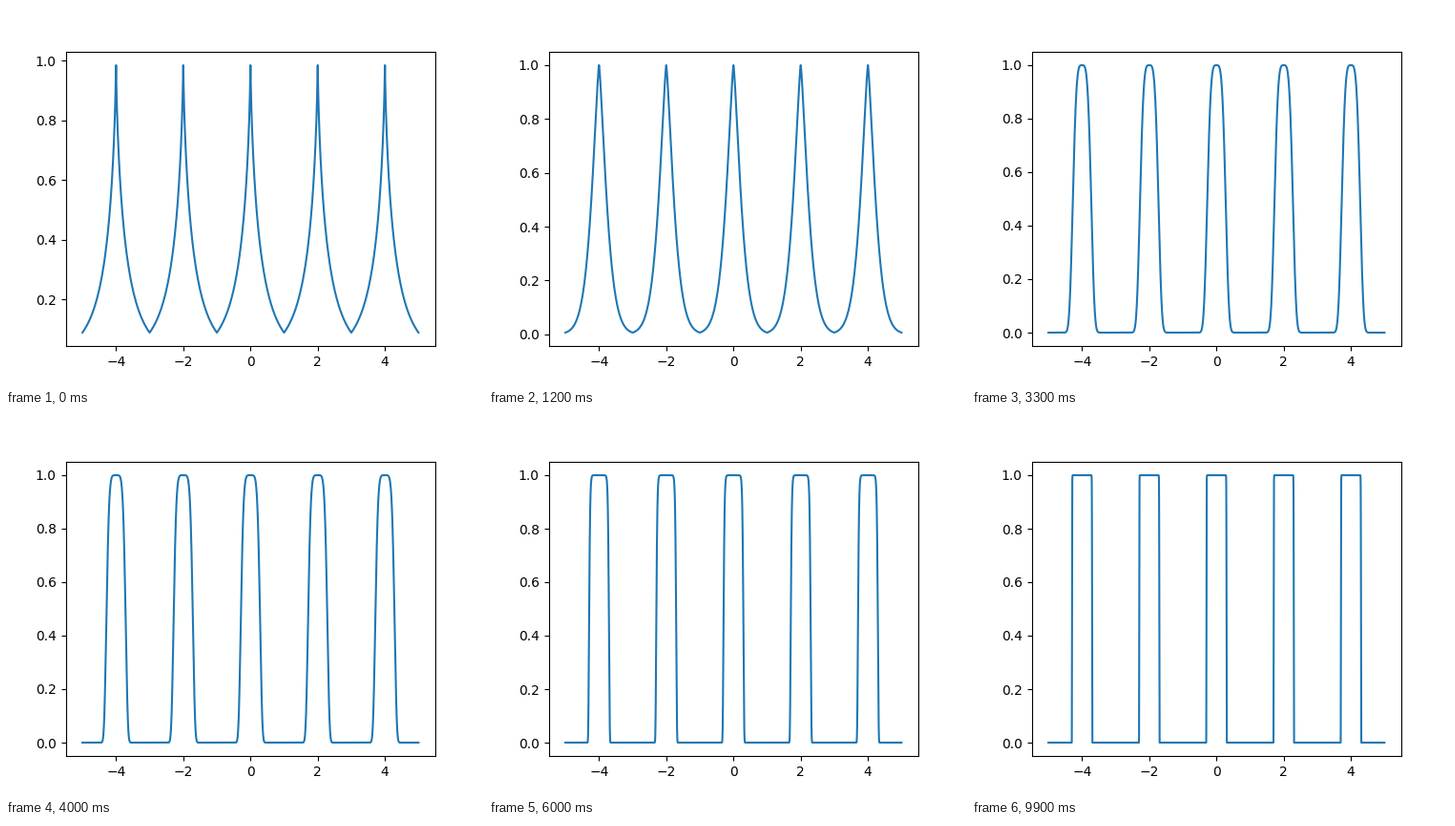
Recreate the animation shown at these times as a matplotlib script. Size 500x400 px, loop 10000 ms.

```python
import numpy as np
import matplotlib.pyplot as plt
from matplotlib.animation import FuncAnimation

FRAMES = 100
INTERVAL = 100
PERIODS = 5
SAMPLES = 1000
HALF_WIDTH = 0.3

# One period of the offset from the pulse centre, repeated along x
offset = np.tile(np.linspace(-1, 1, SAMPLES), PERIODS)
x = np.linspace(-PERIODS, PERIODS, offset.size)
powers = np.exp(np.linspace(-1, 4, FRAMES))


def pulses(power):
    """Super-Gaussian pulse train; a higher power gives squarer pulses."""
    return np.exp(-((offset / HALF_WIDTH) ** 2) ** power)


fig, ax = plt.subplots(figsize=(5, 4), dpi=100)
line, = ax.plot(x, pulses(powers[0]))


def update(i):
    line.set_ydata(pulses(powers[i]))
    ax.relim()
    ax.autoscale_view()
    return line,


anim = FuncAnimation(fig, update, frames=FRAMES, interval=INTERVAL,
                     repeat=True, repeat_delay=0, blit=False)

plt.show()
```
